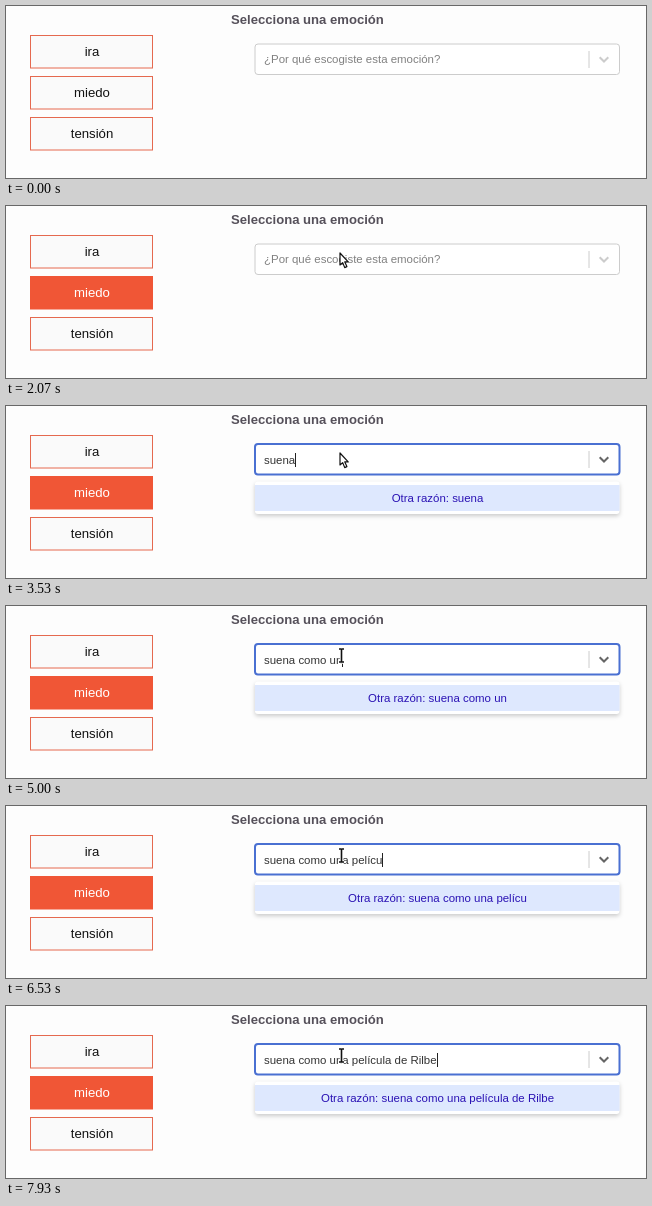
Animation of 640 by 172 pixels, one loop 8000 ms. Source, as an HTML page:

```html
<!DOCTYPE html>
<html lang="es">
<head>
<meta charset="utf-8">
<style>
html, body { margin: 0; height: 100%; overflow: hidden; background: #fdfdfd; }
svg { display: block; width: 640px; height: 172px; font: 11.46px "Liberation Sans", Arial, sans-serif; }
.title { font-size: 13.1px; font-weight: bold; fill: #55505a; }
.button rect { fill: #fafafa; stroke: #e5694f; }
.button text { font-size: 13.2px; fill: #111; }
.button.hover rect { fill: #e6bfa7; }
.button.picked rect { fill: #f05636; stroke: #f05636; }
.button.picked text { fill: #fff; }
.mid { text-anchor: middle; }
#control { fill: #fff; stroke: #ccc; }
.focus #control { stroke: #4a70d2; stroke-width: 2; }
#chevron { fill: none; stroke: #ccc; stroke-width: 2; }
.focus #chevron { stroke: #666; }
.panel { fill: #fff; filter: drop-shadow(0 2px 2px #0003); }
.active { fill: #dee8fe; }
#list text { fill: #222; }
#other text { fill: #2a12b4; }
.cursor { stroke-linejoin: round; }
</style>
</head>
<body>
<svg viewBox="0 0 640 172">
  <g id="page">
    <rect y="172.5" width="640" height="40" fill="#f7f7f7"/>
    <rect y="172.5" width="640" height="1.5" fill="#d9d9d9"/>
    <text class="title" x="225" y="18">Selecciona una emoción</text>
    <g id="buttons"></g>
    <g id="select">
      <rect id="control" x="249" y="38" width="364.5" height="30.5" rx="3"/>
      <path d="M583 45v17" stroke="#ccc"/>
      <path id="chevron" d="M593.7 51.2l4.3 4.3 4.3-4.3"/>
      <text id="hint" x="258" y="57" fill="#808080">¿Por qué escogiste esta emoción?</text>
      <text id="typed" x="258" y="58" fill="#333"></text>
      <rect id="caret" y="47" width="1" height="14" fill="#222"/>
    </g>
    <g id="list">
      <rect class="panel" x="249" y="75" width="364.5" height="130" rx="3"/>
      <rect class="active" x="249" y="78" width="353" height="26.2"/>
      <rect x="602" y="76" width="11" height="130" fill="#f1f1f1"/>
      <rect x="603" y="89" width="9" height="65" fill="#c1c1c1"/>
      <path d="M604.5 84l3-4 3 4z" fill="#888"/>
    </g>
    <g id="other">
      <rect class="panel" x="249" y="75.5" width="364.5" height="32.5" rx="3"/>
      <rect class="active" x="249" y="79" width="364.5" height="26"/>
      <text id="option" class="mid" x="431.5" y="96"></text>
    </g>
  </g>
  <path id="hand" class="cursor" fill="#fff" stroke="#111" stroke-width="1.1"
    d="M-1 1q1-1.6 2 0v4q1.3-.8 2 .3 1.3-.6 1.9.5 1.6-.4 1.6 1.2v3l-1 3.5h-6L-4 8q-.2-1.6 1.4-1L-1 8.500z"/>
  <path id="arrow" class="cursor" fill="#fff" stroke="#111" stroke-width="1.2"
    d="M0 0v12l2.700-2.400 2 5 2.200-1-2.100-4.700h3.400z"/>
  <g id="beam" class="cursor" fill="none">
    <path d="M-2.500-6.500h2l.5.500.500-.500h2M0-6v12M-2.500 6.500h2l.500-.500.500.500h2" stroke="#fff" stroke-width="3.400"/>
    <path d="M-2.500-6.500h2l.500.500.500-.500h2M0-6v12M-2.500 6.500h2l.500-.500.500.500h2" stroke="#111" stroke-width="1.600"/>
  </g>
</svg>
<script>
const $ = id => document.getElementById(id);
const LOOP = 8000, PICK = 1400, OPEN = 2150, TYPE = 3070;
const phrase = "suena como una película de Rilbe";
const keyTimes = [
  3070, 3200, 3300, 3400, 3500, 3730, 3930, 4130, 4400, 4530, 4670, 4800, 4930, 5130, 5330, 5530,
  5730, 5930, 6130, 6330, 6470, 6670, 6870, 7000, 7130, 7200, 7330, 7470, 7600, 7670, 7800, 7870
];
// Pointer stops: time, x, y
const stops = [[70, 122, 124], [350, 122, 124], [900, 100, 90], [1530, 100, 90], [2070, 334, 47]];

["ira", "miedo", "tensión"].forEach((word, i) => {
  const y = 29.5 + 41 * i;
  $("buttons").innerHTML += `<g class="button"><rect x="24.5" y="${y}" width="122" height="32.5"/>
    <text class="mid" x="86" y="${y + 20.5}">${word}</text></g>`;
});
["Acondicionamiento (exposición repetida a la música)", "Armonía",
 "Articulación de las notas", "Asociaciones con un pensamiento"].forEach((label, i) => {
  $("list").innerHTML += `<text class="mid" x="425.500" y="${95 + 26.2 * i}">${label}</text>`;
});
const buttons = [...document.querySelectorAll(".button")];

const clamp = v => Math.min(1, Math.max(0, v));
const ease = v => v * v * (3 - 2 * v);
const show = (id, on) => $(id).style.display = on ? "" : "none";

function pointer(t) {
  let [, x, y] = stops[0];
  for (let i = 1; i < stops.length; i++) {
    const [t0, x0, y0] = stops[i - 1], [t1, x1, y1] = stops[i];
    if (t < t0) break;
    const k = ease(clamp((t - t0) / (t1 - t0)));
    x = x0 + (x1 - x0) * k;
    y = y0 + (y1 - y0) * k;
  }
  return [x, y];
}

function draw(t) {
  const [x, y] = pointer(t);
  const visible = t >= 70;
  const text = phrase.slice(0, keyTimes.filter(k => k <= t).length);
  const scroll = t < TYPE ? 11 * ease(clamp((t - OPEN) / 120)) : 0;
  $("page").setAttribute("transform", `translate(0 ${-scroll})`);

  let overButton = false;
  buttons.forEach((b, i) => {
    const top = 29 + 41 * i;
    const over = visible && x > 24 && x < 147 && y > top && y < top + 33;
    overButton ||= over;
    b.classList.toggle("hover", over);
    b.classList.toggle("picked", i === 1 && t >= PICK);
  });

  $("select").classList.toggle("focus", t >= OPEN);
  show("hint", !text);
  show("caret", text);
  show("list", t >= OPEN && !text);
  show("other", text);
  $("typed").textContent = text;
  $("option").textContent = "Otra razón: " + text;
  const end = 258 + $("typed").getComputedTextLength();
  $("caret").setAttribute("x", Math.round(end));

  // The text field grows under the resting pointer
  const overText = text && end > x - 4;
  show("hand", visible && overButton);
  show("arrow", visible && !overButton && !overText);
  show("beam", overText);
  $("hand").setAttribute("transform", `translate(${x} ${y - 1})`);
  $("arrow").setAttribute("transform", `translate(${x} ${y})`);
  $("beam").setAttribute("transform", `translate(${x + 1.5} ${y + 2.5})`);
}

function frame() {
  draw(performance.now() % LOOP);
  requestAnimationFrame(frame);
}
frame();
</script>
</body>
</html>
```
